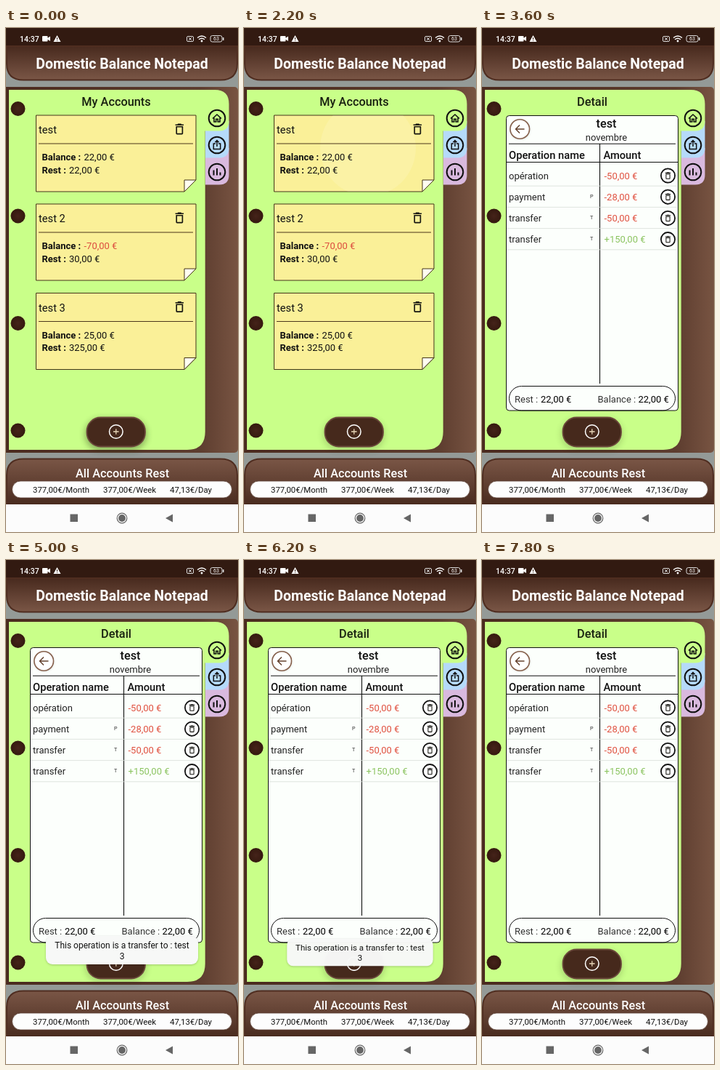
Recreate the animation shown at these times as an HTML page. Size 320 px wide and 693 px high, loop 8 s.

```html
<!DOCTYPE html>
<html lang="en">
<head>
<meta charset="utf-8">
<title>Account book</title>
<style>
  html, body { margin: 0; width: 100%; height: 100%; overflow: hidden; background: #8f9492; }
  svg { display: block; width: 320px; height: 693px; }
  text { font-family: Roboto, sans-serif; font-size: 13px; white-space: pre; }
  .title { font-size: 19.5px; font-weight: 700; fill: #fff; }
  .heading { font-size: 16.3px; font-weight: 500; }
  .name { font-size: 14.7px; }
  .column { font-size: 14.7px; font-weight: 500; }
  .bold { font-weight: 700; }
  .total { font-size: 11.4px; }
  .mark { font-size: 7.2px; }
  .toast { font-size: 12px; }
  .status { font-size: 10.5px; font-weight: 500; fill: #fff; }
  .battery { font-size: 7px; }
</style>
</head>
<body>
<svg id="stage" viewBox="0 0 320 693">
  <defs>
    <linearGradient id="header" x2="0" y2="1">
      <stop stop-color="#482a1e"/><stop offset="1" stop-color="#7a5646"/>
    </linearGradient>
    <linearGradient id="footer" x2="0" y2="1">
      <stop stop-color="#7a5646"/><stop offset="1" stop-color="#482a1e"/>
    </linearGradient>
    <linearGradient id="cover">
      <stop stop-color="#4a2a1e"/><stop offset=".84" stop-color="#5d3d2f"/><stop offset="1" stop-color="#785442"/>
    </linearGradient>
    <radialGradient id="hole">
      <stop stop-color="#45231a"/><stop offset="1" stop-color="#35190f"/>
    </radialGradient>
    <filter id="blur" x="-30%" y="-50%" width="160%" height="200%"><feGaussianBlur stdDeviation="4"/></filter>
    <filter id="soft" x="-30%" y="-50%" width="160%" height="200%"><feGaussianBlur stdDeviation="1.5"/></filter>
    <clipPath id="firstCard"><path d="M41 120H262V209L246 225H41Z"/></clipPath>
    <path id="trash" d="M6 19c0 1.1.9 2 2 2h8c1.1 0 2-.9 2-2V7H6zM8 9h8v10H8zM15.5 4l-1-1h-5l-1 1H5v2h14V4z"/>
  </defs>
</svg>
<script>
const stage = document.getElementById('stage');
const PERIOD = 8000;
const DETAIL_AT = 2400;

const text = (x, y, content, cls = '', fill = '#111', anchor = 'start') =>
  `<text x="${x}" y="${y}" class="${cls}" fill="${fill}" text-anchor="${anchor}">${content}</text>`;
const rect = (x, y, w, h, r, fill, extra = '') =>
  `<rect x="${x}" y="${y}" width="${w}" height="${h}" rx="${r}" fill="${fill}" ${extra}/>`;
const circle = (x, y, r, fill, extra = '') =>
  `<circle cx="${x}" cy="${y}" r="${r}" fill="${fill}" ${extra}/>`;
const path = (d, extra = '') => `<path d="${d}" ${extra}/>`;
const line = (d, width = 1, color = '#111') =>
  path(d, `fill="none" stroke="${color}" stroke-width="${width}"`);
const trash = (x, y, scale) =>
  `<use href="#trash" transform="translate(${x} ${y}) scale(${scale}) translate(-12 -12)" fill="#151510"/>`;
const clamp = v => Math.max(0, Math.min(1, v));
const progress = (t, from, to) => clamp((t - from) / (to - from));

function statusBar() {
  return rect(0, 0, 320, 26, 0, '#321a11') +
    text(19, 18.5, '14:37', 'status') +
    rect(50, 11, 7.5, 7.5, 1, '#fff') + path('M57 14l4-2.5v6.5l-4-2.5z', 'fill="#fff"') +
    path('M70.5 10l5 9h-10z', 'fill="#fff"') + line('M70.5 13v3M70.5 17v1', 1, '#321a11') +
    rect(249.5, 11.5, 9, 7, 1.5, 'none', 'stroke="#ddd"') + line('M252 13l4 4M256 13l-4 4', 1, '#ddd') +
    line('M264 13.5q6-5 12 0M266 15.8q4-3.2 8 0', 1.4, '#fff') + circle(270, 18, 1.4, '#fff') +
    rect(282, 10.5, 16, 8.5, 2.5, 'none', 'stroke="#ddd"') + rect(299, 13, 1.5, 4, 0, '#ddd') +
    text(290, 17.4, '63', 'battery', '#fff', 'middle');
}

function tabs() {
  const ring = y => circle(291, y, 11.3, 'none', 'stroke="#101010" stroke-width="2"');
  return path('M275 165H307.5V202Q307.5 215.5 294 215.5H275Z', 'fill="#d9b9de"') +
    path('M275 128H307.5V165Q307.5 178.5 294 178.5H275Z', 'fill="#b5dafa"') +
    path('M4 85H288Q307.5 85 307.5 104.5V128Q307.5 141.5 294 141.5H274.7V555Q274.7 580 250 580H4Z', 'fill="#c9ff89"') +
    ring(124) + line('M285 124.5l6-5.5 6 5.5M287 123.5v5.5h2.7v-3.8h2.6v3.8h2.7v-5.5', 1.6) +
    ring(161) + line('M289 159h-2.7v7.5h9.4V159H293M291 163v-8M288.3 157.3l2.7-2.7 2.7 2.7', 1.5) +
    ring(198) + line('M286.5 195.5v7M291 193v9.5M295.5 198.5v4', 2);
}

function frame() {
  const holes = [111, 258.5, 406, 553.5].map(y => circle(16.5, y, 10, 'url(#hole)')).join('');
  const border = 'stroke="#4f2d20" stroke-width="2"';
  return rect(0, 0, 320, 693, 0, '#949a97') + statusBar() +
    path('M1 25H319V49Q319 71.5 296 71.5H24Q1 71.5 1 49Z', `fill="url(#header)" ${border}`) +
    text(160, 56, 'Domestic Balance Notepad', 'title', '#fff', 'middle') +
    rect(-6, 81, 326, 503, 5, 'url(#cover)') + tabs() + holes +
    path('M1 657V615Q1 592.5 24 592.5H296Q319 592.5 319 615V657Z', `fill="url(#footer)" ${border}`) +
    text(160.5, 618, 'All Accounts Rest', 'heading', '#fff', 'middle') +
    rect(8.5, 623, 303, 23, 11.5, '#fdfdfd', 'stroke="#5b4035" stroke-width=".8"') +
    text(37, 639, '377,00€/Month', 'total') + text(134, 639, '377,00€/Week', 'total') +
    text(226, 639, '47,13€/Day', 'total') +
    rect(0, 655, 320, 38, 0, '#fcfcfc') +
    rect(88.5, 668.5, 10.5, 10.5, 0, '#666') +
    circle(160, 674, 6.8, 'none', 'stroke="#666" stroke-width="1.2"') + circle(160, 674, 4.9, '#666') +
    path('M230 668.5v11l-10-5.5z', 'fill="#666"');
}

function card(top, name, balance, rest) {
  const bottom = top + 105, fold = bottom - 16;
  const negative = balance.startsWith('-');
  return path(`M41.5 ${top}H262V${fold}L246 ${bottom}H41.5Z`, 'fill="#faf098" stroke="#45351a"') +
    (name === 'test' ? '<circle id="ripple" cx="171" cy="165" fill="#fff" opacity=".13" clip-path="url(#firstCard)"/>' : '') +
    path(`M246 ${fold}H262L246 ${bottom}Z`, 'fill="#fffdf0" stroke="#45351a"') +
    text(45, top + 25, name, 'name') + trash(239.3, top + 19, .82) +
    line(`M45 ${top + 39}H258`, 1.2, '#4c381c') +
    text(49.5, top + 62, 'Balance :', 'bold') +
    text(107.5, top + 62, balance, '', negative ? '#dc4b3e' : '#111') +
    text(49.5, top + 79.5, 'Rest :', 'bold') + text(87, top + 79.5, rest);
}

function accountsPage() {
  return text(152, 107, 'My Accounts', 'heading', '#182010', 'middle') +
    card(120, 'test', '22,00 €', '22,00 €') +
    card(242, 'test 2', '-70,00 €', '30,00 €') +
    card(364.5, 'test 3', '25,00 €', '325,00 €');
}

function operation([name, mark, amount], index) {
  const y = 203 + index * 29.2;
  return text(37, y + 4.8, name, '', '#222') + text(149, y + 1.8, mark, 'mark', '#333') +
    text(168.5, y + 4.8, amount, '', amount[0] === '-' ? '#e0503f' : '#8bc460') +
    circle(256.5, y, 9.6, '#fff', 'stroke="#111" stroke-width="1.8"') + trash(256.5, y, .52) +
    line(`M34 ${y + 14.2}H269`, .8, '#d9ddd8');
}

function detailPage() {
  const operations = [
    ['opération', '', '-50,00 €'], ['payment', 'P', '-28,00 €'],
    ['transfer', 'T', '-50,00 €'], ['transfer', 'T', '+150,00 €']
  ];
  return text(152, 107, 'Detail', 'heading', '#182010', 'middle') +
    rect(33.5, 120.5, 237, 405.5, 4, '#fcfffc', 'id="sheet" stroke="#111"') +
    circle(52.5, 139.8, 13.8, '#0002', 'filter="url(#soft)"') +
    circle(52.2, 139, 13.3, '#fff', 'stroke="#86604c" stroke-width="1.6"') +
    line('M58.5 139H46.5M52 133.5l-5.5 5.5 5.5 5.5', 1.5, '#65432f') +
    text(171.5, 137, 'test', 'heading', '#111', 'middle') +
    text(171.5, 155, 'novembre', '', '#222', 'middle') +
    line('M37 159.3H267M34 184.5H270M162.5 159V489', 1.1) +
    text(37, 179.5, 'Operation name', 'column') + text(167.5, 179.5, 'Amount', 'column') +
    operations.map(operation).join('') +
    rect(37.5, 492.5, 229, 33.5, 17, 'none', 'stroke="#111"') +
    text(45, 514.5, 'Rest :', '', '#333') + text(81, 514.5, '22,00 €', '', '#000') +
    text(159.5, 514.5, 'Balance :', '', '#333') + text(215.5, 514.5, '22,00 €', '', '#000');
}

function addButton() {
  return rect(109, 537, 85, 44, 21, '#1b2b08', 'id="glow" filter="url(#blur)"') +
    rect(111.5, 535.5, 80.5, 40, 19, '#46291c', 'id="button" stroke="#6a483a" stroke-width="1.8"') +
    circle(151.8, 555, 9.3, 'none', 'stroke="#fff" stroke-width="1.5"') +
    line('M148 555h7.6M151.8 551.2v7.6', 1.3, '#e8d6b8');
}

function toast() {
  return rect(55, 518, 210, 39, 9, '#0003', 'filter="url(#soft)"') +
    rect(55, 517, 210, 39, 9, '#f7f8f7') +
    text(160, 534, 'This operation is a transfer to : test', 'toast', '#111', 'middle') +
    text(160, 548.7, '3', 'toast', '#111', 'middle');
}

stage.insertAdjacentHTML('beforeend', frame() +
  `<g id="accounts">${accountsPage()}</g><g id="detail">${detailPage()}</g>` +
  addButton() + `<g id="toast">${toast()}</g>`);

const part = Object.fromEntries(
  ['accounts', 'detail', 'ripple', 'sheet', 'glow', 'button', 'toast'].map(id => [id, document.getElementById(id)]));
const mix = (a, b, k) => `rgb(${a.map((v, i) => Math.round(v + (b[i] - v) * k))})`;

function draw(t) {
  const onDetail = t >= DETAIL_AT;
  part.accounts.style.display = onDetail ? 'none' : '';
  part.detail.style.display = onDetail ? '' : 'none';
  part.ripple.setAttribute('r', 66 * progress(t, 2020, 2200));

  const settled = onDetail ? progress(t, DETAIL_AT, 2800) : 1;
  part.sheet.setAttribute('fill', mix([249, 250, 244], [252, 255, 252], settled));
  part.button.setAttribute('fill', mix([86, 59, 42], [70, 41, 28], settled));
  part.glow.setAttribute('opacity', .36 - .18 * progress(t, 0, 1000));

  // The toast pops in, then shrinks and sinks as it leaves.
  const enter = progress(t, 3820, 3980);
  const leave = progress(t, 6140, 6380);
  const scale = .9 + .1 * enter - .16 * leave;
  part.toast.setAttribute('opacity', enter * (1 - leave ** 3));
  part.toast.setAttribute('transform', `translate(160 ${536.5 + 12 * leave}) scale(${scale}) translate(-160 -536.5)`);
}

const start = performance.now();
function tick() {
  draw((performance.now() - start) % PERIOD);
  requestAnimationFrame(tick);
}
draw(0);
requestAnimationFrame(tick);
</script>
</body>
</html>
```
